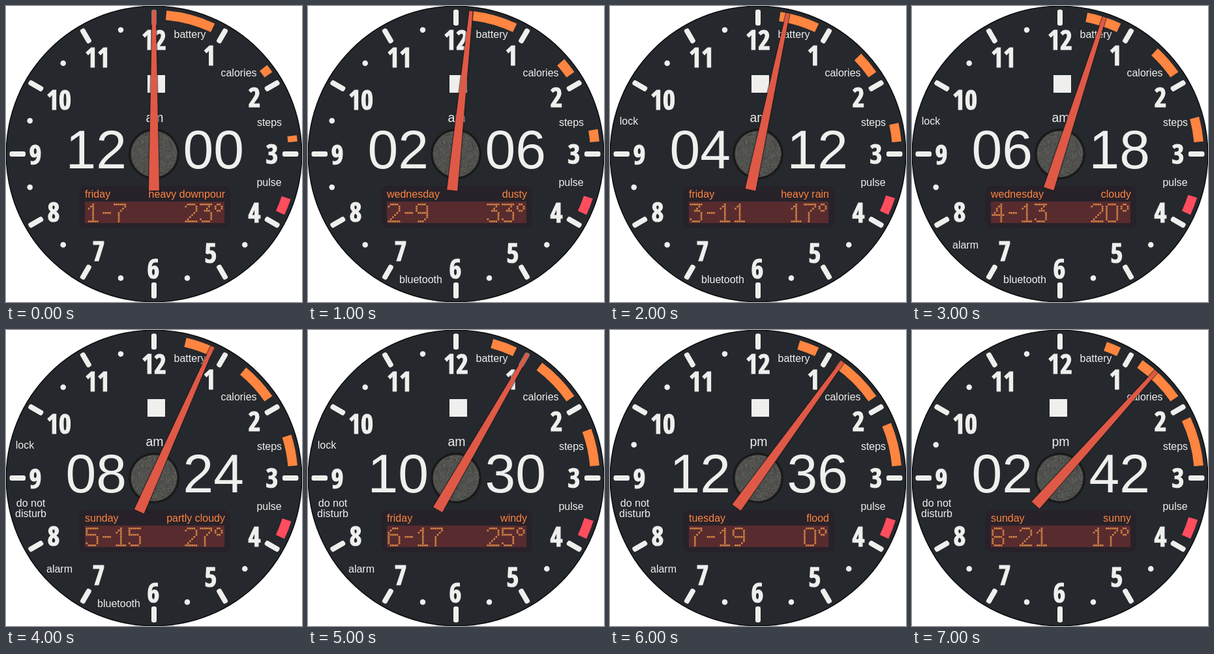
An HTML page with a canvas for the animation above (8 s loop, 454 by 454 pixels).

```html
<!DOCTYPE html>
<html lang="en">
<head>
<meta charset="utf-8">
<title>Watch face</title>
<style>
html, body { margin: 0; overflow: hidden; background: #fff; }
canvas { display: block; }
</style>
</head>
<body>
<canvas id="face" width="454" height="454"></canvas>
<script>
const ctx = document.getElementById('face').getContext('2d');
const C = 227, TAU = Math.PI * 2, RAD = Math.PI / 180;
const BG = '#25282d', WHITE = '#efefed', ORANGE = '#ff8540';
const SANS = '"Liberation Sans", Arial, sans-serif';
const NARROW = '"Open Sans Condensed", "Roboto Condensed", "Open Sans", Roboto, sans-serif';

const reports = [
  ['friday', 'heavy downpour', 23], ['wednesday', 'dusty', 33],
  ['friday', 'heavy rain', 17], ['wednesday', 'cloudy', 20],
  ['sunday', 'partly cloudy', 27], ['friday', 'windy', 25],
  ['tuesday', 'flood', 0], ['sunday', 'sunny', 17]
];

// Numeral centres, from 12 clockwise
const numerals = [[227, 52], [312, 76], [381, 140], [408, 227], [381, 317], [314, 379],
  [226, 403], [142, 376], [73, 316], [45, 228], [81, 144], [140, 79]];

// Status labels: first step shown, dial angle of the dot they replace, lines
const statuses = [
  [1, 195, ['bluetooth', 173, 425]],
  [2, 285, ['lock', 29, 182]],
  [3, 225, ['alarm', 82, 372]],
  [4, 255, ['do not', 38, 271], ['disturb', 38, 287]]
];

// Dot-matrix strokes: grid points as column and row digits
const glyphs = {
  0: '10 40 51 57 48 18 07 01 10', 1: '12 30 38,18 58', 2: '01 10 40 51 53 08 58',
  3: '00 50 23 43 54 57 48 18 07', 4: '48 40 05 55', 5: '50 00 03 43 54 57 48 18 07',
  6: '40 20 02 07 18 48 57 54 43 03', 7: '00 50 51 24 28',
  8: '10 40 51 53 44 14 03 01 10,14 05 07 18 48 57 55 44',
  9: '54 14 03 01 10 40 51 56 38 18', '-': '14 44', '°': '10 20 31 32 23 13 02 01 10'
};

function text(str, x, y, size, color = WHITE, align = 'center') {
  ctx.font = `${size}px ${SANS}`;
  ctx.fillStyle = color;
  ctx.textAlign = align;
  ctx.fillText(str, x, y);
}

function disc(x, y, r, color) {
  ctx.fillStyle = color;
  ctx.beginPath();
  ctx.arc(x, y, r, 0, TAU);
  ctx.fill();
}

function box(x, y, w, h, r, color) {
  ctx.fillStyle = color;
  ctx.beginPath();
  ctx.roundRect(x, y, w, h, r);
  ctx.fill();
}

function rotated(degrees, draw) {
  ctx.save();
  ctx.translate(C, C);
  ctx.rotate(degrees * RAD);
  draw();
  ctx.restore();
}

function gauge(from, to, color = ORANGE) {
  ctx.strokeStyle = color;
  ctx.lineWidth = 14.5;
  ctx.beginPath();
  ctx.arc(C, C, 213.5, (from - 90) * RAD, (to - 90) * RAD);
  ctx.stroke();
}

function matrix(str, x, y) {
  const pitch = 3.25;
  ctx.fillStyle = '#d08345';
  for (const ch of str) {
    const dots = new Set();
    for (const stroke of glyphs[ch].split(',')) {
      const points = stroke.split(' ').map(p => [+p[0], +p[1]]);
      points.slice(1).forEach(([x1, y1], k) => {
        const [x0, y0] = points[k];
        const n = Math.max(Math.abs(x1 - x0), Math.abs(y1 - y0));
        for (let s = 0; s <= n; s++)
          dots.add(Math.round(x0 + (x1 - x0) * s / n) + ',' + Math.round(y0 + (y1 - y0) * s / n));
      });
    }
    for (const dot of dots) {
      const [col, row] = dot.split(',');
      ctx.fillRect(x + col * pitch, y + row * pitch, 2.7, 2.7);
    }
    x += ch === '-' ? 20 : 22.7;
  }
}

function dial() {
  disc(C, C, 227.5, '#0b0c0d');
  disc(C, C, 226, BG);
  for (let a = 0; a < 360; a += 30) rotated(a, () => box(-4, -221.5, 8, 24.5, 3, WHITE));
  ctx.font = `900 condensed 41px ${NARROW}`;
  ctx.fillStyle = ctx.strokeStyle = WHITE;
  ctx.textAlign = 'center';
  ctx.lineWidth = 1.2;
  numerals.forEach(([x, y], k) => {
    ctx.fillText(k || 12, x, y + 14.5);
    ctx.strokeText(k || 12, x, y + 14.5);
  });
}

function status(step) {
  for (const a of [135, 165, 315, 345]) rotated(a, () => disc(0, -197, 4.3, WHITE));
  for (const [first, angle, ...lines] of statuses) {
    if (step >= first && step < first + 4) for (const [str, x, y] of lines) text(str, x, y, 16);
    else rotated(angle, () => disc(0, -197, 4.3, WHITE));
  }
}

function gauges(step) {
  gauge(5 + 2 * step, 25);
  gauge(Math.max(35, 51.8 - 3 * step), 55.3);
  gauge(82.5 - 2.5 * step, 85);
  gauge(108.3 - 0.2 * step, 115, '#ff4d5e');
  text('battery', 282, 49, 16);
  text('calories', 357, 108, 16);
  text('steps', 404, 184, 16);
  text('pulse', 403.5, 276, 16);
}

function panel(step) {
  const [day, weather, degrees] = reports[step];
  box(112, 276, 232, 65, 10, '#272229');
  box(121, 300, 214, 33, 0, '#582b2e');
  text(day, 121, 294, 16, ORANGE, 'left');
  text(weather, 336, 294, 16, ORANGE, 'right');
  matrix(`${step + 1}-${7 + 2 * step}`, 122.5, 303);
  matrix(degrees + '°', degrees > 9 ? 274.5 : 297.2, 303);
}

function clock(step) {
  const pad = n => String(n).padStart(2, '0');
  text(pad(2 * step % 12 || 12), 185, 248.5, 84, WHITE, 'right');
  text(pad(6 * step), 271.5, 248.5, 84, WHITE, 'left');
  text(step < 6 ? 'am' : 'pm', 228, 178, 19.5);
}

function hub() {
  disc(C, C, 39, '#191a19');
  disc(C, C, 35.5, '#51514e');
  let seed = 7;
  const random = () => (seed = seed * 16807 % 2147483647) / 2147483647;
  for (let k = 0; k < 900; k++) {
    const r = 35 * Math.sqrt(random()), a = TAU * random();
    ctx.fillStyle = k % 2 ? '#ffffff12' : '#00000020';
    ctx.fillRect(C + r * Math.cos(a), C + r * Math.sin(a), 1.5, 1.5);
  }
}

function hand(angle) {
  rotated(angle, () => {
    ctx.beginPath();
    ctx.moveTo(-2.6, -220.5);
    ctx.lineTo(2.6, -220.5);
    ctx.lineTo(8, 56);
    ctx.lineTo(-8, 56);
    ctx.closePath();
    ctx.strokeStyle = '#2018188c';
    ctx.lineWidth = 3;
    ctx.stroke();
    ctx.fillStyle = '#df5946';
    ctx.fill();
  });
}

function draw(step) {
  ctx.clearRect(0, 0, 454, 454);
  dial();
  gauges(step);
  status(step);
  box(step < 7 ? 217 : 211, 106, 27, 27, 0, WHITE);
  clock(step);
  panel(step);
  hub();
  hand(6 * step);
}

let shown = -1;
function tick() {
  const step = Math.floor(performance.now() / 1000) % 8;
  if (step !== shown) draw(shown = step);
  requestAnimationFrame(tick);
}
tick();
</script>
</body>
</html>
```
